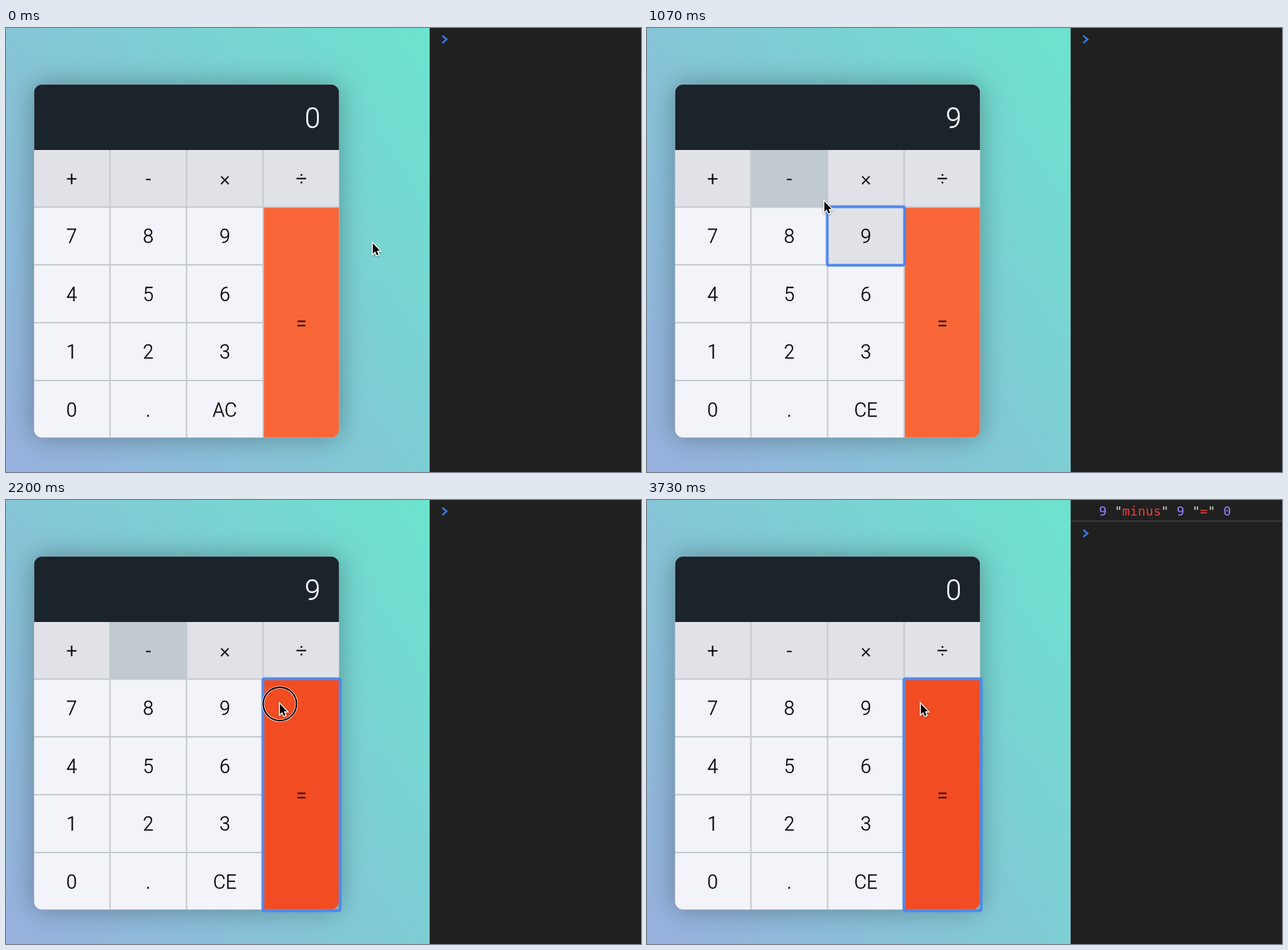
Write an HTML page with a canvas that moves like this. It is 895 px wide and 626 px high and loops after 3790 ms.

```html
<!DOCTYPE html>
<html lang="en">
<head>
<meta charset="utf-8">
<title>Calculator</title>
<style>
html, body { margin: 0; height: 100%; overflow: hidden; background: #202020; }
canvas { display: block; }
</style>
</head>
<body>
<canvas width="895" height="626"></canvas>
<script>
const c = document.querySelector('canvas').getContext('2d');
const LOOP = 3790, STEP = 1000 / 15; // the picture changes 15 times a second

// Pointer moves and clicks, timed in steps.
const home = { x: 516, y: 302 };
const moves = [
  { from: 0, to: 8, x: 316, y: 290 },
  { from: 14, to: 19, x: 202, y: 210 },
  { from: 24, to: 27, x: 357, y: 282 },
  { from: 27, to: 30, x: 385, y: 286 },
];
const clicks = [10, 20, 33, 39, 45, 50];
const HOVER_FROM = 6; // the page ignores the pointer before this step

const LEFT = 39.5, TOP = 79.5, SCREEN = 92.5, W = 106, H = 79.5, GAP = 2;
const keys = ['+-×÷', '789', '456', '123', '0.C', '='].flatMap((row, r) =>
  [...row].map((id, i) => {
    const tall = id === '=', col = tall ? 3 : i;
    return {
      id, op: r === 0,
      x: LEFT + col * (W + GAP),
      y: TOP + SCREEN + (tall ? 1 : r) * (H + GAP),
      h: tall ? 4 * H + 3 * GAP : H,
    };
  }));

const keyAt = p => keys.find(k => p.x >= k.x && p.x < k.x + W && p.y >= k.y && p.y < k.y + k.h);

function pointer(n) {
  let { x, y } = home;
  for (const m of moves) {
    const p = Math.min(1, Math.max(0, (n - m.from) / (m.to - m.from)));
    const ease = Math.sin(p * Math.PI / 2);
    x += (m.x - x) * ease;
    y += (m.y - y) * ease;
  }
  return { x, y };
}

function stateAt(n) {
  const done = clicks.filter(s => s < n).length;
  const last = clicks.filter(s => s <= n).pop();
  const mouse = pointer(n);
  return {
    mouse,
    pressed: last === n,
    focus: last && keyAt(pointer(last)),
    hover: n >= HOVER_FROM && keyAt(mouse),
    minusHeld: done === 2,
    display: done === 1 || done === 2 ? '9' : '0',
    clear: done ? 'CE' : 'AC',
    logged: done > 2,
  };
}

function rect(x, y, w, h, color) {
  c.fillStyle = color;
  c.fillRect(x, y, w, h);
}

function rounded(x, y, w, h, r) {
  c.beginPath();
  c.roundRect(x, y, w, h, r);
}

function stroke(color, width) {
  c.strokeStyle = color;
  c.lineWidth = width;
  c.stroke();
}

// Light text, slightly thickened by a hairline.
function label(text, x, y, size, color) {
  c.font = `300 ${size}px Roboto, sans-serif`;
  c.textAlign = 'center';
  c.fillStyle = c.strokeStyle = color;
  c.lineWidth = .3;
  c.fillText(text, x, y);
  c.strokeText(text, x, y);
}

function keyColor(k, s) {
  const active = k === s.hover || k === s.focus;
  if (k.id === '=') return active ? '#f24c23' : '#f86638';
  if (k.op) return active || k.id === '-' && s.minusHeld ? '#c2cad1' : '#e1e2e7';
  return active ? '#e1e2e7' : '#f3f4fa';
}

function calculator(s) {
  const g = c.createLinearGradient(648.8, 76.8, -51.8, 549.2);
  g.addColorStop(0, '#6ce3ce');
  g.addColorStop(1, '#98b0de');
  rect(0, 0, 597, 626, g);

  c.save();
  rounded(LEFT, TOP, 4 * W + 3 * GAP, 498, 12);
  c.shadowColor = 'rgba(0,0,0,.32)';
  c.shadowBlur = 38;
  c.fillStyle = '#c2cad0';
  c.fill();
  c.shadowColor = 'transparent';
  c.clip();
  rect(LEFT, TOP, 4 * W + 3 * GAP, SCREEN, '#1b232b');
  for (const k of keys) rect(k.x, k.y, W, k.h, keyColor(k, s));
  c.restore();

  label(s.display, 432, 140.5, 40, '#fff');
  for (const k of keys)
    label(k.id === 'C' ? s.clear : k.id, k.x + W / 2, k.y + k.h / 2 + 10.2, 27, '#000');

  if (s.focus) {
    const { x, y, h } = s.focus;
    rounded(x - 1.5, y - 1.5, W + 3, h + 3, 2);
    stroke('rgba(75,135,240,.4)', 4.8);
    stroke('#4a86ea', 3);
  }
}

function consolePane(s) {
  rect(597, 0, 298, 626, '#202020');
  rect(597, 0, 1, 626, '#333');
  let y = 16;
  if (s.logged) {
    c.font = '18.2px "DejaVu Sans Mono", monospace';
    c.textAlign = 'left';
    let x = 637;
    for (const part of '9 "minus" 9 "=" 0'.split(/([\d"])/)) {
      c.fillStyle = part === '"' ? '#d5d5d5' : /\d/.test(part) ? '#9980ff' : '#e93f3b';
      c.fillText(part, x, 22);
      x += c.measureText(part).width;
    }
    rect(597, 29, 298, 1.5, '#404040');
    y = 47;
  }
  c.beginPath();
  c.moveTo(615, y - 5);
  c.lineTo(621, y);
  c.lineTo(615, y + 5);
  stroke('#367cdf', 2.4);
}

function cursor({ mouse: { x, y }, pressed }) {
  if (pressed) {
    c.beginPath();
    c.arc(x + 1, y + 1.5, 23.5, 0, 7);
    stroke('rgba(255,255,255,.75)', 3.6);
    stroke('#000', 1.9);
  }
  c.save();
  c.translate(x + 1, y + 1.5);
  c.shadowColor = 'rgba(0,0,0,.35)';
  c.shadowBlur = 3;
  c.shadowOffsetY = 1;
  const arrow = new Path2D('M0 0V14.5L3.3 11.4L5.7 17L8 16L5.7 10.5H10Z');
  c.strokeStyle = '#fff';
  c.lineWidth = 2.8;
  c.stroke(arrow);
  c.shadowColor = 'transparent';
  c.fillStyle = '#000';
  c.fill(arrow);
  c.restore();
}

const start = performance.now();
function draw() {
  const t = (performance.now() - start) % LOOP;
  const s = stateAt(Math.floor((t + 3.5) / STEP));
  calculator(s);
  consolePane(s);
  cursor(s);
  requestAnimationFrame(draw);
}
draw();
</script>
</body>
</html>
```
